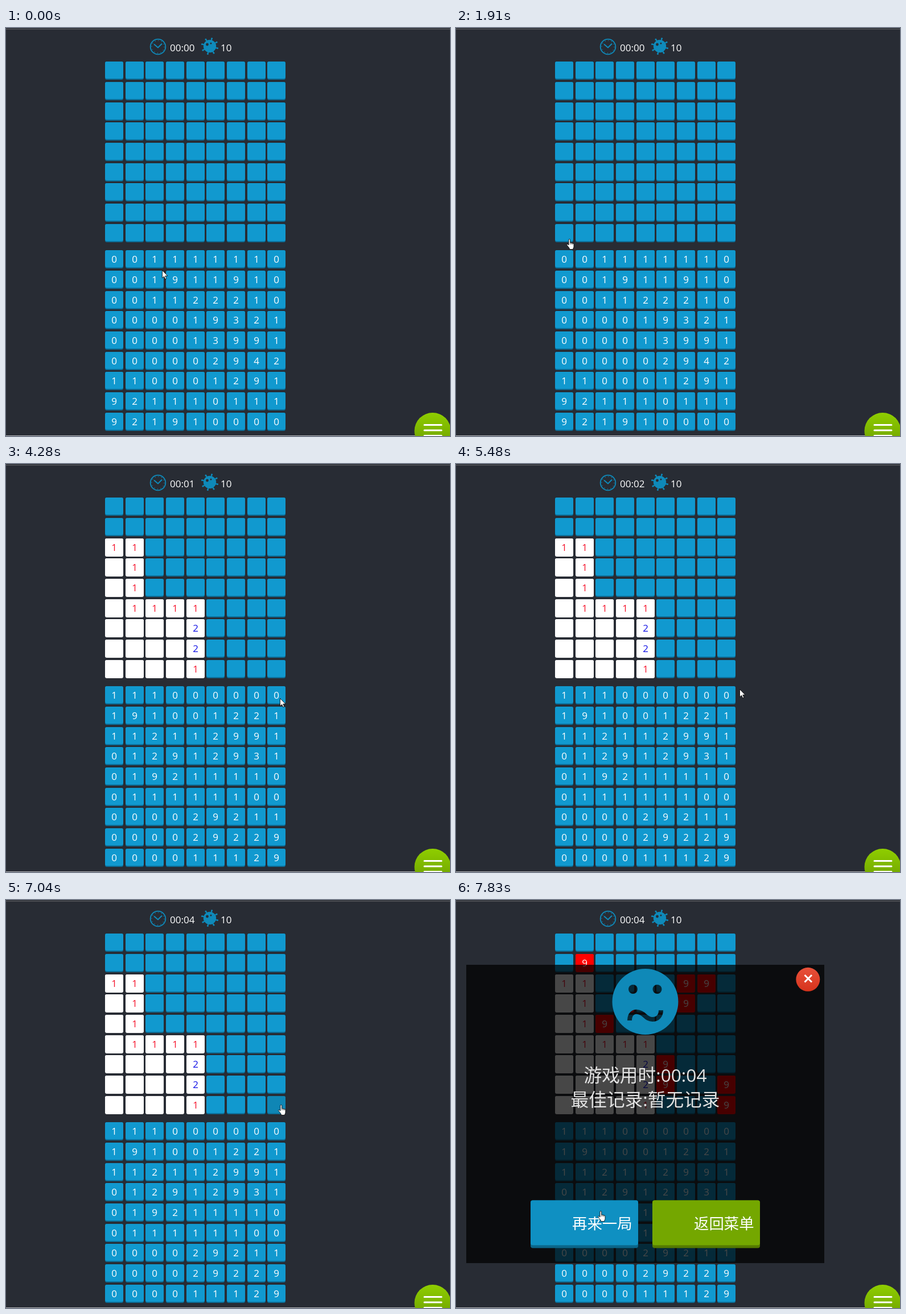
Write an HTML page that moves like this. It is 780 px wide and 718 px high and loops after 8 s.

```html
<!DOCTYPE html>
<html lang="zh">
<head>
<meta charset="utf-8">
<title>扫雷</title>
<style>
html, body { margin: 0; width: 100%; height: 100%; overflow: hidden; background: #282c34; }
svg { display: block; width: 780px; height: 718px; }
text { font: 500 17px "Open Sans", "Noto Sans CJK SC", "Noto Sans CJK", sans-serif; fill: #fff; }
.mid { text-anchor: middle; }
.big { font-size: 31.7px; fill: #e2e2e2; }
.btn { font-size: 26.4px; }
</style>
</head>
<body>
<svg viewBox="0 0 780 718">
  <defs>
    <linearGradient id="green" x2="0" y2="1"><stop stop-color="#8fce00"/><stop offset="1" stop-color="#6a9b00"/></linearGradient>
    <linearGradient id="red" x2="0" y2="1"><stop stop-color="#e8513a"/><stop offset="1" stop-color="#d6331c"/></linearGradient>
    <mask id="holes">
      <circle cx="332.5" cy="179" r="58" fill="#fff"/>
      <circle cx="311" cy="157" r="8"/><circle cx="353.5" cy="157" r="8"/>
      <path d="M305 212C305 200 312 196 319 197 331 198 333 210 345 210 355 210 360 203 360 194" fill="none" stroke="#000" stroke-width="8"/>
    </mask>
    <path id="arrow" d="M.5 .5V14L3.6 11.2 5.8 16 7.9 15 5.8 10.3H10Z" fill="#fff" stroke="#000" stroke-width=".8"/>
    <g id="hand" transform="translate(-6)" stroke="#000" stroke-width=".8">
      <path d="M4 2Q4 .5 5.3 .5T6.6 2V7Q8.2 6.4 8.8 7.4 10.3 7 10.8 8 12.8 7.7 13 9.5V13.5Q13 15.5 11.8 17V18.5H5.4V17Q3.5 14 1 11.2 .2 10 1 9.4T4 11Z" fill="#fff"/>
      <path d="M6.6 7V10M8.8 7.4V10M10.8 8V10.5" fill="none" stroke-width=".6"/>
    </g>
  </defs>
  <path d="M0 2H780" stroke="#55565a" stroke-width="1.5"/>
  <path d="M0 717.5H780" stroke="#b5b7ba"/>
  <g id="icons" stroke="#0f8aba" fill="none">
    <circle cx="267" cy="33" r="13.3" stroke-width="1.8"/>
    <circle cx="267" cy="33" r="11" stroke-width="1.4" stroke-dasharray="1 4.76"/>
    <path d="M260 28.5 267 34.5 274 27.5" stroke-width="2"/>
  </g>
  <text x="377" y="41">10</text>
  <g id="view"></g>
  <circle cx="749.5" cy="709" r="32" fill="url(#green)"/>
  <path d="M735 698.5H765M735 708H765M735 717.5H765" stroke="#fff" stroke-width="3" stroke-linecap="round"/>
  <g id="modal"></g>
  <use id="cursor"/>
</svg>
<script>
const LOOP = 8000, OPEN_AT = 2710, OVER_AT = 7160, FACE_AT = 7310;
const PITCH = 35.65, LEFT = 174, TOP = 59.4, LOWER = 391.3, N = 9;
const $ = id => document.getElementById(id);

// Mines are given as "row column" digit pairs; 9 marks a mine, other cells count neighbours.
function makeGrid(mines) {
  const spots = mines.split(' ').map(([r, c]) => [+r, +c]);
  const near = (r, c, d) => spots.filter(([y, x]) => Math.max(Math.abs(y - r), Math.abs(x - c)) <= d).length;
  return Array.from({ length: N }, (_, r) =>
    Array.from({ length: N }, (_, c) => near(r, c, 0) ? 9 : near(r, c, 1)));
}
const first = makeGrid('13 16 35 46 47 56 67 70 80 83');
const second = makeGrid('11 26 27 33 36 42 65 75 78 88');

// Cells uncovered by the click in the bottom left corner
const opened = new Set();
function flood(r, c) {
  const id = r * N + c;
  if (r < 0 || c < 0 || r >= N || c >= N || opened.has(id)) return;
  opened.add(id);
  if (second[r][c] === 0)
    for (let k = 0; k < 9; k++) flood(r + Math.floor(k / 3) - 1, c + k % 3 - 1);
}
flood(N - 1, 0);

// Pointer legs: start, end, x, y; each eases out from wherever the last one ended.
const legs = [
  [120, 1120, 199, 377], [1430, 1490, 200, 371], [1910, 2400, 198, 366],
  [3300, 3700, 466, 422], [4200, 4520, 500, 400], [5460, 5780, 483, 368],
  [5780, 6670, 484, 360], [7500, 7830, 255, 547]
];
function pointer(t) {
  let x = 274, y = 426;
  for (const [start, end, toX, toY] of legs) {
    const p = Math.min(1, Math.max(0, (t - start) / (end - start))), e = p * (2 - p);
    x += (toX - x) * e;
    y += (toY - y) * e;
  }
  return [Math.round(x), Math.round(y)];
}

const box = (x, y, w, h, fill, r = 3) => `<rect x="${x}" y="${y}" width="${w}" height="${h}" rx="${r}" fill="${fill}"/>`;
const text = (x, y, s, cls = '', fill = '') =>
  `<text x="${x}" y="${y}" class="${cls}"${fill && ` style="fill:${fill}"`}>${s}</text>`;

function cell(r, c, top, label, fill = '#1199cf', edge = '#0c6f99', ink = '') {
  const x = Math.round(LEFT + c * PITCH), y = Math.round(top + r * PITCH);
  return box(x, y, 32, 32, edge) + box(x, y, 32, 30, fill) + text(x + 16, y + 22, label, 'mid', ink);
}

function boards(t, hot) {
  const grid = t < OPEN_AT ? first : second;
  let s = '';
  for (let r = 0; r < N; r++) for (let c = 0; c < N; c++) {
    const n = grid[r][c];
    if (t >= OPEN_AT && opened.has(r * N + c))
      s += cell(r, c, TOP, n || '', '#fff', '#fff', n > 1 ? '#1414e6' : '#f5122a');
    else if (t >= OVER_AT && n === 9) s += cell(r, c, TOP, n, '#f00', '#f00');
    else s += cell(r, c, TOP, '', r === N - 1 && c === hot ? '#0f86b5' : undefined);
    s += cell(r, c, LOWER, n);
  }
  return s;
}

function button(x, label, fill, edge) {
  return box(x, 528.5, 189, 84, edge, 4) + box(x, 528.5, 189, 79, fill, 4) + text(x + 73, 579, label, 'btn');
}

function dialog(t) {
  if (t < OVER_AT) return '';
  const loaded = t >= FACE_AT, y = loaded ? 98 : 0;
  return '<rect x="18" y="114" width="629" height="525" opacity=".72"/>'
    + (loaded ? '<rect x="274" y="120" width="117" height="118" fill="#0f89b8" mask="url(#holes)"/>'
      + '<circle cx="618.3" cy="139.8" r="21" fill="url(#red)"/>'
      + '<path d="M612.5 132 625 144.5M625 132 612.5 144.5" stroke="#fff" stroke-width="3"/>' : '')
    + text(332.5, 222 + y, '游戏用时:00:04', 'mid big')
    + text(332.5, 265 + y, '最佳记录:暂无记录', 'mid big')
    + button(131, '再来一局', '#0f90c2', '#0b668a')
    + button(345, '返回菜单', '#74a700', '#557a00');
}

// Mine icon: body, eight legs, two eyes
let bug = '<circle cx="358" cy="32" r="10.8" fill="#0f8aba"/>';
for (let i = 0; i < 8; i++) {
  const a = (i + .33) * Math.PI / 4, x = Math.cos(a), y = Math.sin(a);
  bug += `<path d="M358 32l${x * 13.5} ${y * 13.5}" stroke-width="2"/>`
    + `<circle cx="${358 + x * 14}" cy="${32 + y * 14}" r="1.5" fill="#0f8aba" stroke="none"/>`;
}
$('icons').innerHTML += bug + '<g fill="#282c34" stroke="none"><circle cx="353.5" cy="29" r="2.4"/><circle cx="360" cy="27" r="1.5"/></g>';

let shown;
function frame(now) {
  const t = now % LOOP, [x, y] = pointer(t);
  const secs = Math.min(4, Math.max(0, Math.floor((t - 2560) / 1000)));
  const onBoard = t < OVER_AT && y < 376 && x >= LEFT && x < 491;
  const onButton = t >= FACE_AT && y > 528 && x > 131 && x < 320;
  const hot = onBoard && y < 369 ? Math.floor((x - LEFT) / PITCH) : -1;
  const key = [secs, hot, t >= OPEN_AT, t >= OVER_AT, t >= FACE_AT].join();
  if (key !== shown) {
    shown = key;
    $('view').innerHTML = text(288, 41, '00:0' + secs) + boards(t, hot);
    $('modal').innerHTML = dialog(t);
  }
  $('cursor').setAttribute('href', onBoard || onButton ? '#hand' : '#arrow');
  $('cursor').setAttribute('transform', `translate(${x} ${y})`);
  requestAnimationFrame(frame);
}
frame(0);
</script>
</body>
</html>
```
